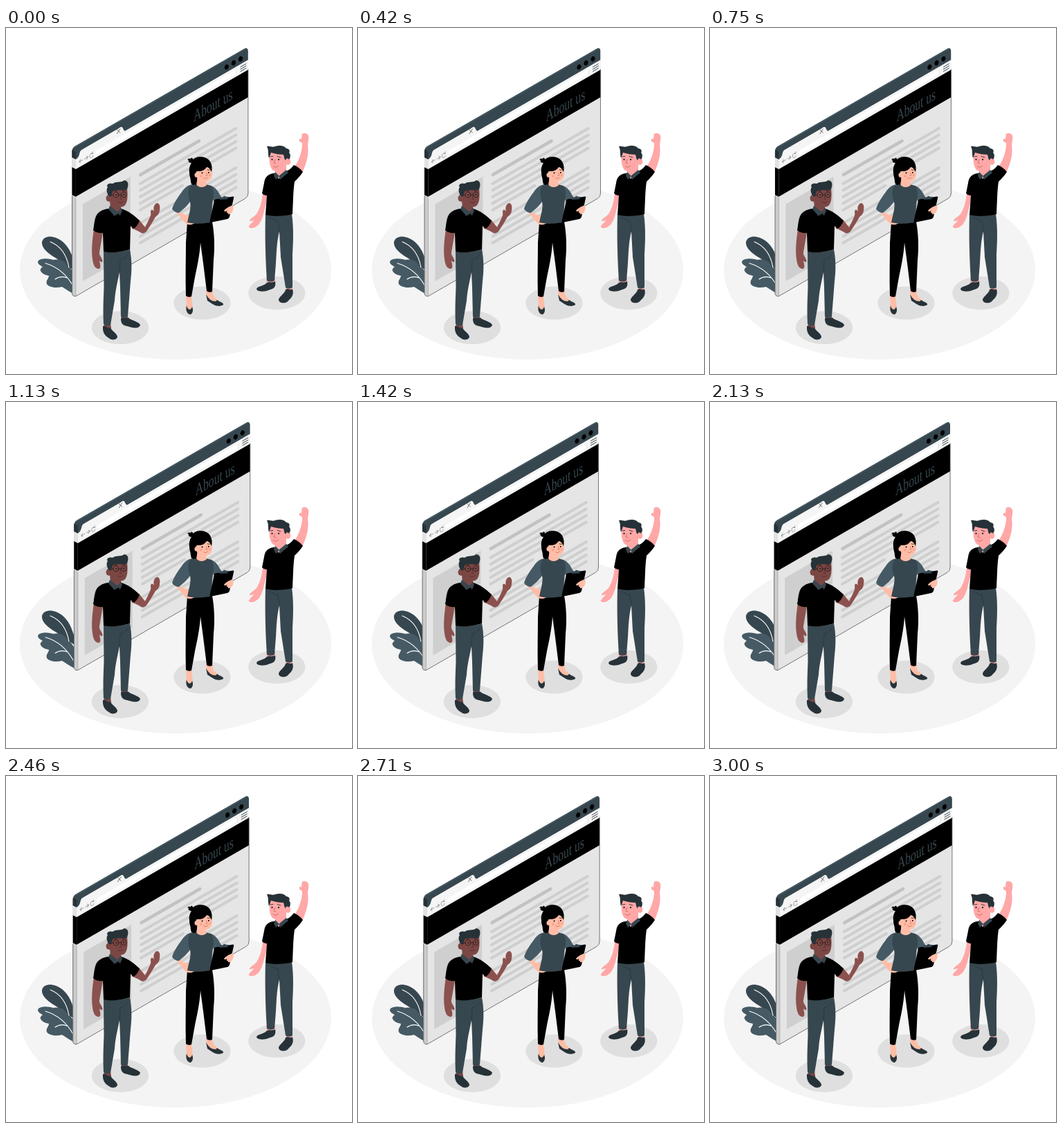
An HTML page with a canvas that plays this animation: 500x500 px, repeating every 3.04 s.

```html
<!DOCTYPE html>
<html lang="en">
<head>
<meta charset="utf-8">
<title>About us</title>
<style>
html, body { margin: 0; width: 100%; height: 100%; overflow: hidden; background: #fff; }
canvas { display: block; width: 500px; height: 500px; }
</style>
</head>
<body>
<canvas id="stage"></canvas>
<script>
const canvas = document.getElementById('stage');
const ctx = canvas.getContext('2d');
const ratio = window.devicePixelRatio || 1;
canvas.width = canvas.height = Math.round(500 * ratio);

const SLATE = '#37474f', STEEL = '#455a64', INK = '#263238', BLACK = '#000';
const BROWN = '#7b4744', TAN = '#8b514e', PEACH = '#ffbda7', PINK = '#ffa8a7';
const SLOPE = 0.577;
const LOOP = 3040, STEP = 1000 / 24, SHAKE = 3000, LEAD = 29;
const KEYS = [0, -1, 2, -4, 4, -4, 4, -4, 2, -1, 0];

function fill(color, d) {
  ctx.fillStyle = color;
  ctx.fill(new Path2D(d));
}

function stroke(color, width, d) {
  ctx.strokeStyle = color;
  ctx.lineWidth = width;
  ctx.stroke(new Path2D(d));
}

function oval(color, x, y, rx, ry = rx, turn = 0) {
  ctx.fillStyle = color;
  ctx.beginPath();
  ctx.ellipse(x, y, rx, ry, turn, 0, Math.PI * 2);
  ctx.fill();
}

// A line that follows the window's slant
function slant(color, width, x1, y1, x2) {
  stroke(color, width, `M${x1} ${y1}L${x2} ${y1 - (x2 - x1) * SLOPE}`);
}

// A slanted panel with vertical sides
function panel(color, x1, y1, x2, h) {
  const y2 = y1 - (x2 - x1) * SLOPE;
  fill(color, `M${x1} ${y1}L${x2} ${y2}V${y2 + h}L${x1} ${y1 + h}Z`);
}

function shakeAt(ms) {
  const p = (ms % SHAKE) / SHAKE * (KEYS.length - 1);
  const i = Math.floor(p);
  return KEYS[i] + (KEYS[i + 1] - KEYS[i]) * (p - i);
}

function drawFloor() {
  oval('#f4f4f4', 245, 349.5, 225, 129.8);
  oval('#dfdfdf', 165, 433, 41.2, 24);
  oval('#dfdfdf', 283.5, 397.5, 41.2, 24);
  oval('#dfdfdf', 391.3, 383, 41.2, 24);
}

function drawPlant() {
  fill(SLATE, 'M101 352C91 346 81 340 73 333C63 327 51 319 52 309C54 301 64 300 72 303C85 308 92 319 96 331C99 339 101 345 101 352Z');
  fill(STEEL, 'M102 386C94 383 88 378 81 374C73 376 62 375 59 370C57 365 62 362 62 358C57 357 52 355 50 351C49 348 51 347 53 345C49 343 44 340 47 336C52 332 61 333 68 335C79 333 85 337 88 343C95 348 101 356 102 366Z');
  stroke('#fff', 1.1, 'M64 309C79 315 88 329 91 346');
  stroke('#fff', 1.1, 'M57 340C74 345 88 357 97 373M88 361C80 358 75 360 71 363');
}

function drawWindow() {
  const outline = 'M101 387.6L346 246.3Q350 243.8 350 239V33.5Q349.5 28 345 29.7L99.5 171Q95.5 173.7 95.5 179V383.5Q96 387 98.5 387.6Z';
  ctx.save();
  ctx.clip(new Path2D(outline));
  fill('#e5e5e5', 'M90 20H360V400H90Z');
  fill('#cbcbcb', 'M95 180L101 183V388H95Z');

  fill(SLATE, 'M95 165L350 20V46L101 190L95 187Z');
  slant(STEEL, 2.4, 98, 172.5, 348);
  fill(INK, 'M95 175L101 179V190L95 187Z');
  panel('#f5f5f5', 101, 190, 352, 15);
  fill('#e2e2e2', 'M95 187L101 190V205L95 202Z');
  fill('#f5f5f5', 'M101 190.5L104 187C107 184 105.5 178.5 109.5 176L163 145C167 141.5 168.5 143 169.5 146Q171 150 174 149V154Z');
  fill('#fff', 'M130 183Q129 178 133 175.5L330 61.5Q333 60.5 333 64V66L133 181.5Z');

  panel(BLACK, 101, 204, 352, 39.7);
  fill(BLACK, 'M95 201L101 204V243.7L95 241Z');
  panel('#cfcfcf', 111, 254.5, 180, 111.5);

  slant('#c2c2c2', 4.8, 194.5, 212, 279);
  for (const y of [225, 234.5, 244, 253.5, 282, 291.5, 301, 310.5]) {
    slant('#cfcfcf', 4.1, 194, y, 332.5);
  }
  slant('#cfcfcf', 4.1, 194, 263, 255);
  ctx.restore();
  stroke('#555', 0.8, 'M350 60V239Q350 243.8 346 246.3L101 387.6Q96 388 95.6 383.5V243');
  stroke('#8a8a8a', 0.5, 'M101 246V387');

  for (const [x, y] of [[319, 56.3], [329, 50.4], [339, 44.6]]) {
    oval(BLACK, x, y, 2.9, 3.9, 0.35);
  }
  for (let i = 0; i < 3; i++) slant(SLATE, 1, 339, 56.3 + i * 3.2, 347);
  for (let i = 0; i < 3; i++) oval('#bbb', 333, 62 + i * 2, 0.5);
  stroke('#555', 0.8, 'M160.5 147.3L165 151.3M165 145.8L160.5 152.8');
  stroke('#777', 0.7, 'M106 193.5L111 190.6M108 190L106 193.5L108 194.5M113.5 189.2L118.5 186.3M116.3 185.3L118.5 186.3L116.5 190');
  stroke('#777', 0.7, 'M125.5 181.5C122 179.5 120 184 121.5 187C123 188.5 125 187 125.8 184.5M123.3 181.3L125.5 181.5V179');

  ctx.save();
  ctx.transform(0.65, -0.375, 0, 1, 271, 135.6);
  ctx.font = '24px "Liberation Serif", "Times New Roman", serif';
  ctx.fillStyle = SLATE;
  ctx.fillText('About us', 0, 0);
  ctx.restore();
}

function drawLeftMan() {
  fill(BROWN, 'M141 426H151L152 434L143 436ZM166 413H176L175 422L167 423Z');
  fill(INK, 'M140 431C143 428 146 435 151 433C153 438 160 441 161 446C161 450 154 452 150 449C145 446 139 442 140 431Z');
  fill(INK, 'M166 420C169 417 172 421 176 418C181 423 192 424 194 429C193 434 186 434 179 432C173 430 166 431 166 420Z');
  fill(SLATE, 'M141 322C153 326 169 323 179 320C182 335 182 350 180 366L176 417C173 419 169 419 166 417L165 375L164 353C160 372 158 380 157 394L151 429C148 431 144 430 141 428C140 405 141 390 141.5 375Z');
  stroke(INK, 0.7, 'M164 353L165 335C170 334 174 331 176 327');
  fill(TAN, 'M127 290C125 305 123 320 125 334C126 343 129 348 134 348C138 347 136 342 135 336C137 339 141 339 139 335C138 331 134 328 135 324L140 295Z');
  fill(TAN, 'M181 289L193 278L201 288C204 282 207 276 209 271C210 268 208 265 210 263C212 262 213 264 214 265C212 259 215 253 219 253C222 254 223 258 222 263C222 268 219 271 216 273C212 280 207 288 203 294C199 298 196 297 192 294Z');
  fill(BLACK, 'M149 261C138 262 131 267 129 275C127 282 127 288 126 292C130 296 136 297 140 296L141 323C153 326 169 323 179 320L180 286L184 290C188 288 191 284 193 278C185 271 177 264 166 261Z');
  fill(BROWN, 'M150 249L151 262L160 270L166 262V255Z');
  fill(SLATE, 'M150 257L148 262L157 272L162 266ZM166 259L168 264L165 271L161 267Z');
  fill(BROWN, 'M151 233L175 231C176 242 176 251 172 256C168 260 161 259 155 255L151 250Z');
  oval(BROWN, 148.8, 246, 4.3, 5);
  fill(INK, 'M148 242C145 237 145 232 147 230C144 227 149 223 154 225C160 221 166 224 171 220C178 221 177 228 175 233C168 236 161 233 155 235C153 238 153 242 151 243Z');
  stroke('#241b1b', 0.8, 'M155 241a4 4 0 1 0 8 0a4 4 0 1 0-8 0M166.5 240.7a3.8 3.8 0 1 0 7.6 0a3.8 3.8 0 1 0-7.6 0M163 241L166.5 240.5M155 241L150 243');
  stroke('#241b1b', 0.8, 'M156 236L161 235M168 235L173 235');
  oval('#241b1b', 159.7, 241, 1.1);
  oval('#241b1b', 170, 240.6, 1.1);
  stroke('#4d2926', 0.8, 'M165 242L167 247L164 248M162 252Q166 254 169 251');
}

function drawWoman() {
  fill(PEACH, 'M260 386H268L270 405L265 412L261 405ZM289 379H298L300 388L310 397L304 398L290 389Z');
  fill(INK, 'M261 401C262 406 266 410 269 403C271 407 270 412 267 414C262 414 259 408 261 401Z');
  fill(INK, 'M289 385C292 390 296 395 303 395L305 393C309 396 315 397 314 400C309 403 302 402 297 398L291 394Z');
  fill(BLACK, 'M262 280H298C301 296 302 316 300 335L298 381C295 382 292 382 290 380L285 340L281 310C280 328 276 346 273 360L268 388C266 389 262 389 260 387C259 360 260 335 260 310Z');
  fill(PEACH, 'M241 260L251 265C256 270 261 271 267 270C271 270 274 273 272 275C275 278 274 282 271 283C264 286 260 283 257 280Z');
  fill(BLACK, 'M266 208C268 216 264 224 272 230L280 227L277 210Z');
  fill(STEEL, 'M270 226C262 227 258 231 254 237C248 245 243 252 240 261C242 265 246 267 250 267C256 262 262 257 266 251ZM296 228C305 231 308 239 312 246L303 253L297 246Z');
  fill(SLATE, 'M274 226L266 228C262 236 263 244 266 251C268 260 264 270 262 281C274 284 288 283 298 280C297 267 298 257 299 248C301 240 300 233 297 228L289 226Z');
  fill(PEACH, 'M277 213L275 226C278 231 286 231 290 227L289 217Z');
  fill(PEACH, 'M275 200L297 200C299 210 298 217 294 220C288 224 281 222 275 216Z');
  fill(BLACK, 'M268 195C264 195 263 192 264 190L262 191C263 188 265 188 267 189C268 186 270 188 270 190C278 183 291 186 295 193C298 198 298 203 297 208C295 204 293 201 290 201C286 207 280 207 276 207C273 209 275 213 276 216C276 221 275 224 275 227C269 224 265 217 265 209C264 203 266 198 268 195Z');
  oval(PEACH, 275, 212.5, 2.5, 3.2);
  oval(BLACK, 283.5, 209.5, 1);
  oval(BLACK, 292.8, 209, 1);
  oval('#ff9d8a', 282, 214, 2, 1.5);
  oval('#ff9d8a', 294.5, 213, 1.6, 1.4);
  stroke('#c76753', 0.7, 'M289 209L291 213L288.5 213.5M285.5 217Q289 219 292 216');
  stroke(BLACK, 0.7, 'M281 206L285 205.5M291 205L294 205.5');
  fill(BLACK, 'M301 249Q301.5 248 303 247.6L328 243.6Q330 243.8 329 246L323 273Q322 275.4 320 276L296 281Q294 281 294.6 279Z');
  fill(SLATE, 'M308 248L310 244.5L313 244.5Q316 241.5 318 244L321 243.5L320 247.5Z');
  fill(PEACH, 'M328 256C322 258 317 261 315 264C316 266 318 265 320 264C318 266 319 268 321 267C320 270 323 270 326 267C329 264 329 260 328 256Z');
}

function drawRightMan() {
  fill(PINK, 'M376 360H389V370L377 371ZM404 370H414L413 380L405 381Z');
  fill(INK, 'M389 366C384 369 381 366 377 368C373 373 363 373 362 377C363 382 374 381 379 379C384 377 391 377 389 366Z');
  fill(INK, 'M414 377C411 380 408 375 404 378C403 384 394 388 394 393C395 398 402 398 406 396C411 391 417 387 414 377Z');
  fill(SLATE, 'M375 269C387 272 402 271 413 268C416 290 415 310 414 327L414 375C411 377 407 377 404 375L397 331L395 294C391 310 391 325 390 340L388 365C385 367 380 367 377 365C375 335 374 300 375 269Z');
  stroke(INK, 0.7, 'M395 294L393 279C389 278 384 276 381 273');
  fill(PINK, 'M371 239C370 250 367 261 362 269C357 274 352 276 352 279C354 280 356 278 358 278C356 282 351 284 351 288C355 291 362 288 366 283C369 278 370 275 371 272L379 241Z');
  fill(PINK, 'M415 204C420 196 424 189 426 181C428 174 428 170 428 166C424 165 422 161 425 160C428 163 427 155 428 153C431 151 436 152 437 156C438 161 436 166 436 169C438 181 435 195 428 209Z');
  fill(BLACK, 'M387 210C378 211 374 216 373 224L370 239C373 242 375 242 377 242L375 270C387 273 402 272 414 269C415 250 415 235 417 222C422 217 426 213 429 208C425 203 421 200 416 198C413 202 410 205 405 207Z');
  fill(PINK, 'M389 198L389 212L394 218L405 207V193Z');
  fill(SLATE, 'M389 208L387 213L390 219L395 214ZM405 205L408 209L396 219L394 214Z');
  fill(PINK, 'M381 179L406 182L405 198C400 207 389 210 384 204C380 197 380 187 381 179Z');
  oval(PINK, 407.5, 193, 3.8, 5);
  fill(INK, 'M380 188C378 181 380 177 377 171C381 170 385 173 389 171C396 169 402 170 405 174C409 174 411 178 409 180C412 183 411 188 409 190C407 188 405 188 404 191C402 190 402 186 401 183C395 183 389 182 383 180C382 183 381 186 380 188Z');
  oval(INK, 384.5, 190, 1.2);
  oval(INK, 394, 190, 1.2);
  stroke(INK, 0.9, 'M382 186L386 185.5M392 185.5L397 187');
  stroke('#c9605f', 0.8, 'M389 190L387 195L390 196M386 200Q390 203 394 199');
}

function draw(now) {
  const t = now % LOOP;
  const tick = Math.floor((t + 4) / STEP);
  ctx.setTransform(ratio, 0, 0, ratio, 0, 0);
  ctx.fillStyle = '#fff';
  ctx.fillRect(0, 0, 500, 500);
  ctx.lineCap = ctx.lineJoin = 'round';
  drawFloor();
  drawPlant();
  ctx.save();
  ctx.translate(shakeAt(tick * STEP + LEAD), 0);
  drawWindow();
  ctx.restore();
  drawLeftMan();
  drawWoman();
  drawRightMan();
}

const start = performance.now();
function loop() {
  draw(performance.now() - start);
  requestAnimationFrame(loop);
}
loop();
</script>
</body>
</html>
```
